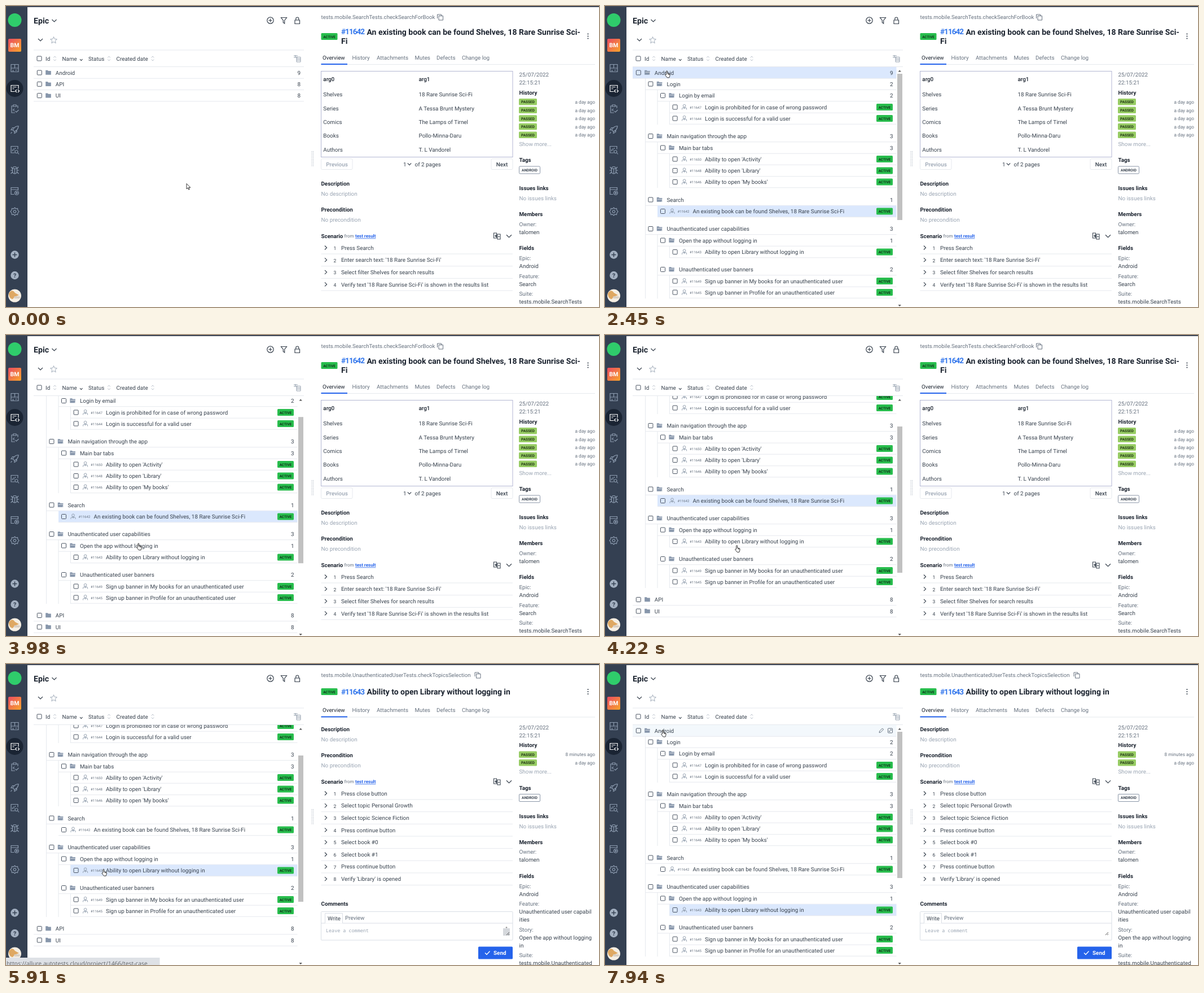
These frames come from a looping animation (1051 px wide and 533 px high, 8000 ms). An HTML page:

```html
<!DOCTYPE html>
<html lang="en">
<head>
<meta charset="utf-8">
<title>Test case tree</title>
<style>
html, body { margin: 0; width: 100%; height: 100%; overflow: hidden; background: #fff; }
svg { display: block; width: 100%; height: 100%; font-family: Roboto, "Open Sans", sans-serif; text-rendering: geometricPrecision; }
</style>
</head>
<body>
<svg id="stage" viewBox="0 0 1051 533" xmlns="http://www.w3.org/2000/svg"></svg>
<script>
const LOOP = 8000;
const INK = '#39434f', DARK = '#1c2430', GREY = '#66717f', MUTE = '#9aa5b3', LINE = '#e6e9ee', BLUE = '#2563eb';
const BOOKS = '18 Rare Sunrise Sci-Fi';

// drawing helpers
const T = (x, y, s, { size = 9.9, fill = INK, w = 400, a = 'start', more = '' } = {}) =>
  `<text x="${x}" y="${y + size * 0.36}" font-size="${size}" fill="${fill}" font-weight="${w}" text-anchor="${a}" ${more}>${s}</text>`;
const R = (x, y, w, h, fill, more = '') => `<rect x="${x}" y="${y}" width="${w}" height="${h}" fill="${fill}" ${more}/>`;
const box = (x, y, w, h, stroke, r = 0) => R(x, y, w, h, 'none', `stroke="${stroke}" rx="${r}"`);
const P = (d, stroke = INK, w = 1, fill = 'none') => `<path d="${d}" fill="${fill}" stroke="${stroke}" stroke-width="${w}"/>`;
const C = (x, y, r, fill, more = '') => `<circle cx="${x}" cy="${y}" r="${r}" fill="${fill}" ${more}/>`;
const H = (x1, x2, y, color = LINE) => R(x1, y, x2 - x1, 1, color);
const at = (x, y, s) => `<g transform="translate(${x} ${y})">${s}</g>`;
const head = (x, y, s) => T(x, y, s, { fill: DARK, w: 600, size: 9.8 });
const down = (x, y, k = 4, c = INK) => P(`M${x - k} ${y - k / 2}l${k} ${k} ${k} ${-k}`, c, 1.2);
const right = (x, y) => P(`M${x - 2} ${y - 3.5}l3.5 3.5 -3.5 3.5`, INK, 1.2);
const check = (x, y) => box(x - 4, y - 4, 8, 8, '#4a5462', 1);
const copy = (x, y) => P(`M${x - 5} ${y + 2}v-7h7v2M${x - 2.5} ${y - 2.5}h7.5v7.5h-7.5z`, GREY, 1);
const active = (x, y, w = 29) => R(x, y - 6, w, 12, '#28bd4d', 'rx="1.5"') +
  T(x + w / 2, y + 0.3, 'ACTIVE', { size: 6.3, w: 700, a: 'middle', fill: '#10331b' });
const sorter = x => P(`M${x - 2.2} 91.5l2.2-2.5 2.2 2.5M${x - 2.2} 94.5l2.2 2.5 2.2-2.5`, '#b4bcc7', 0.9);

function sidebar() {
  const c = '#8d9cb0', ic = (y, d, col = c) => at(15.5, y, P(d, col, 1.2));
  return R(0, 0, 38, 533, '#344052') +
    C(15.5, 25, 12, '#2fcc6b') +
    R(4, 58, 23, 23, 'url(#tile)', 'rx="2"') + T(15.5, 69.7, 'BM', { size: 10.5, w: 700, a: 'middle', fill: '#fff' }) +
    C(15.5, 146, 15, '#1a2433') +
    ic(110, 'M-6.5-6.5h13v13h-13zM-6.5 0h13M0-6.5v6.5M-3 3v3.5M1 3.5h3') +
    ic(146, 'M0 5.5h-6.5v-11h13v6M-4-2.5h7M-4 .5h3M3.5 2l-2.5 2.5 2.5 2.5M5.5 2l2.5 2.5-2.5 2.5', '#fff') +
    ic(182, 'M-2.5-5h-3v12h6M2.5-5h3v4M-2.5-7h5v3h-5zM-.5 0l-2.5 2 2.5 2M1 4l2 2 4-4') +
    ic(219, 'M6.5-6.5c-5 0-8 3-10 7l3 3c4-2 7-5 7-10zM-3.5.5h-3l2.5-4h3M-.5 3.5v3l4-2.5v-3M-5 4l-2 3') +
    ic(255, 'M0 5h-6.5v-11.5h12v5M-4 2v-3M-1.5 1v-4M1-2v-2M3 .5a2.5 2.5 0 1 1-.1 0M5.5 5l2 2.5') +
    ic(291, 'M-3.5-3a3.5 3.5 0 0 1 7 0zM-4-3h8v5a4 4 0 0 1-8 0zM0-3v9M-4 0h-3.5M4 0h3.5M-4 3l-3 3M4 3l3 3M-4-3l-2.5-3M4-3l2.5-3') +
    ic(328, 'M-1 5.5h-5.5v-12h12.5v5M-6.5-3h12.5M3.5-.5a3.5 3.5 0 1 1-.1 0M2.7 1.5l2.3 1.5-2.3 1.5z') +
    ic(364, 'M0-7l2 2 3-.5 .5 3 2 2.5-2 2.5-.5 3-3-.5-2 2-2-2-3 .5-.5-3-2-2.5 2-2.5 .5-3 3 .5zM0-2.3a2.3 2.3 0 1 1-.1 0') +
    C(15.5, 440.5, 7.2, '#a3b0c1') + at(15.5, 440.5, P('M-4 0h8M0-4v8', '#344052', 1.5)) +
    C(15.5, 477, 7.2, '#a3b0c1') + T(15.5, 477, '?', { size: 10.5, w: 700, a: 'middle', fill: '#344052' }) +
    C(15.5, 513, 11.5, '#f5eee3') + P('M5 509c5-8 9-4 11-1l7 4c-6 2-8 3-11 7-4 0-7-4-7-10z', 'none', 0, '#dfa862') +
    R(14, 514, 11, 4, '#d8cfc4', 'rx="2"');
}

function listHeader() {
  return T(49, 25.5, 'Epic', { size: 14.2, w: 600, fill: DARK }) + down(85.5, 26) +
    C(468.5, 25.5, 5.7, 'none', `stroke="${INK}" stroke-width="1.2"`) + P('M465.5 25.5h6M468.5 22.5v6', INK, 1.2) +
    P('M487.5 20.5h10l-3.8 5v5.5l-2.4-1.8v-3.7z', INK, 1.2) +
    P('M512 25h8.5v6.5h-8.5zM513.8 25v-2.5a2.5 2.5 0 0 1 5 0v2.5', INK, 1.2) +
    down(61, 60, 4) +
    P('M84.5 54.5l1.7 3.9 4.2.4-3.2 2.8 1 4.2-3.7-2.2-3.7 2.2 1-4.2-3.2-2.8 4.2-.4z', '#a1acba', 1) +
    H(49, 528, 77.5) + check(59, 93) + T(70, 93, 'Id') + sorter(86.5) +
    T(99.5, 93, 'Name') + P('M131 94l2.3 2.7 2.3-2.7', INK, 1.1) +
    T(146, 93, 'Status') + sorter(182.5) + T(195.5, 93, 'Created date') + sorter(260) +
    P('M510 88h7M510 91h7M513 87v4M515 90.5h7v8.5h-7zM515 93.5h7M515 96h7', '#8c98a8', 0.9) + H(49, 528, 107);
}

// tree rows: name, centre y, level, child count or case id
const rows = [
  ['Android', 118, 0, 9], ['Login', 138, 1, 2], ['Login by email', 158.5, 2, 2],
  ['Login is prohibited for in case of wrong password', 179, 3, '#11647'],
  ['Login is successful for a valid user', 199, 3, '#11644'],
  ['Main navigation through the app', 230.5, 1, 3], ['Main bar tabs', 251, 2, 3],
  ["Ability to open 'Activity'", 271, 3, '#11650'], ["Ability to open 'Library'", 291.5, 3, '#11648'],
  ["Ability to open 'My books'", 311.5, 3, '#11646'],
  ['Search', 343, 1, 1], ['An existing book can be found Shelves, ' + BOOKS, 363.5, 2, '#11642'],
  ['Unauthenticated user capabilities', 394.5, 1, 3], ['Open the app without logging in', 415, 2, 1],
  ['Ability to open Library without logging in', 435.5, 3, '#11643'],
  ['Unauthenticated user banners', 466.5, 2, 2],
  ['Sign up banner in My books for an unauthenticated user', 487, 3, '#11649'],
  ['Sign up banner in Profile for an unauthenticated user', 507, 3, '#11645'],
  ['API', 538.5, 0, 8], ['UI', 559, 0, 8]
].map(([name, y, level, tag]) => ({ name, y, level, tag, leaf: typeof tag === 'string' }));
const shut = rows.filter(r => r.level === 0).map((r, i) => ({ ...r, y: 118 + i * 20.3 }));

const folder = (x, y, open) => P(`M${x - 4.8} ${y + 3.8}v-8h3.6l1.2 1.3h4.8v6.7z`, 'none', 0, '#8796ab') +
  (open ? P(`M${x - 3.6} ${y - 0.8}h9l-1.5 4.6`, '#fff', 0.7) : '');
const person = (x, y) => C(x, y - 2.3, 2.3, 'none', 'stroke="#8a97a8" stroke-width=".9"') +
  P(`M${x - 4} ${y + 4.5}v-1.5q0-2 2-2h4q2 0 2 2v1.5M${x - 1.5} ${y + 1}l1.5 2 1.5-2`, '#8a97a8', 0.9);
const grip = (x, y) => [0, 1, 2, 3].map(i => R(x, y - 4 + i * 2.4, 1, 1, '#98a3b2') + R(x + 2.5, y - 4 + i * 2.4, 1, 1, '#98a3b2')).join('');
const tools = (x, y) => P(`M${x - 19.5} ${y + 3.5}l.6-2.6 5-5 2 2-5 5z`, GREY, 1) + box(x - 4, y - 4, 8, 8, GREY, 1) +
  P(`M${x - 2} ${y + 2}l4-4M${x} ${y - 2}h2v2M${x - 2} ${y}v2h2`, GREY, 0.8);

function row(r, edge, open, bg, hovered) {
  const { name, y, level, tag, leaf } = r, x = 59.3 + level * 21.6, left = level ? x - 9.5 : 49;
  const s = (bg ? R(left, y - 10, edge - left, 20, bg) : '') + H(left, edge, y + 9.7) + check(x, y);
  if (leaf) {
    return s + person(x + 16.5, y) + T(x + 26, y + 0.7, tag, { size: 6.1, fill: GREY }) + T(x + 53, y, name) +
      (hovered ? grip(x - 9, y) : active(481, y));
  }
  return s + folder(x + 15.7, y, open && name !== 'API' && name !== 'UI') + T(x + 28.5, y, name) +
    (hovered ? tools(edge - 11, y) : T(edge - 8.7, y, tag, { a: 'middle' }));
}

// right pane
const TABS = [[561, 'Overview'], [613.5, 'History'], [657, 'Attachments'], [724.5, 'Mutes'], [763, 'Defects'], [808, 'Change log']];
const tabs = y => TABS.map(([x, s], i) => T(x, y, s, { size: 9.8, fill: i ? GREY : DARK })).join('') +
  H(558, 1044, y + 12) + R(558.5, y + 11, 46.5, 2, BLUE);
const path = (s, end) => T(558.5, 20, s, { fill: GREY, size: 9.65 }) + copy(end, 20);
const number = (y, s) => T(594, y, s, { size: 13.6, w: 600, fill: '#3276ec', more: 'letter-spacing="-1"' });
const title = (x, y, s) => T(x, y, s, { size: 14, w: 600, fill: DARK });
const kebab = y => [-4, 0, 4].map(d => C(1031.5, y + d, 1.1, INK)).join('');
const pair = (y, name) => head(558.5, y, name) + T(558.5, y + 17.5, 'No ' + name.toLowerCase(), { fill: MUTE });
const scenario = (y, steps) => head(558.5, y, 'Scenario') + T(599.5, y + 0.5, 'from', { size: 8, fill: GREY }) +
  T(619, y + 0.5, 'test result', { size: 8, w: 600, fill: BLUE, more: 'text-decoration="underline"' }) +
  P(`M864.5 ${y - 5}h5v9h-5zM871 ${y - 3}h5v9h-5zM866 ${y}h3.5M872 ${y + 1.5}h3M867.5 ${y - 1.5}l2 1.5-2 1.5`, INK, 1.1) +
  down(891.5, y + 0.5, 4.5) +
  steps.map((s, i) => {
    const v = y + 21 + i * 21.65;
    return right(567, v) + T(583, v + 0.8, i + 1, { size: 8.6, a: 'middle' }) + T(594, v, s) + H(558.5, 898, v + 10.5);
  }).join('');
const passed = (y, when) => R(909, y - 6, 32, 11.5, '#97cc64', 'rx="1.5"') +
  T(925, y, 'PASSED', { size: 6.5, w: 700, a: 'middle', fill: '#1e3312' }) + T(1044, y, when, { size: 8.3, a: 'end', fill: GREY });

function side(y, runs, fields) {
  const x = 909.5, grey = (v, s, fill = MUTE) => T(x, v, s, { fill });
  let v = y + 48.4, s = T(x, y, '25/07/2022', { fill: GREY }) + T(x, y + 14, '22:15:21', { fill: GREY }) + head(x, y + 31.5, 'History');
  runs.forEach((when, i) => { s += passed(v + i * 14.65, when); });
  v += runs.length * 14.65 + 0.8;
  s += grey(v, 'Show more...') + head(x, v + 28.5, 'Tags') + box(909.5, v + 40, 37, 13, '#8b97a8', 1.5) +
    T(928, v + 46.6, 'ANDROID', { size: 6.5, w: 600, a: 'middle' }) +
    head(x, v + 79, 'Issues links') + grey(v + 96.5, 'No issues links') +
    head(x, v + 125, 'Members') + grey(v + 142.3, 'Owner:', GREY) + T(x, v + 156.3, 'talomen') + head(x, v + 185, 'Fields');
  v += 202.8;
  for (const [label, ...lines] of fields) {
    s += grey(v, label + ':', GREY);
    lines.forEach((l, i) => { s += T(x, v + 14 * (i + 1), l); });
    v += 17.4 + 14 * lines.length;
  }
  return s;
}

function searchPane() {
  const table = [['arg0', 'arg1'], ['Shelves', BOOKS], ['Series', 'A Tessa Brunt Mystery'], ['Comics', 'The Lamps of Tirnel'],
    ['Books', 'Pollo-Minna-Daru'], ['Authors', 'T. L Vandorel']];
  return path('tests.mobile.SearchTests.checkSearchForBook', 769.5) +
    active(558.5, 54) + number(45.5, '#11642') + title(639.5, 45.5, `An existing book can be found Shelves, ${BOOKS.slice(0, -2)}`) +
    title(594, 62, 'Fi') + kebab(53.5) + tabs(91) + box(558.5, 115.5, 339.5, 152, '#b3b7d3') +
    table.map(([a, b], i) => {
      const y = i ? 132.2 + i * 24.4 : 129.8, o = i ? {} : { w: 500, fill: DARK };
      return T(562.3, y, a, o) + T(731.5, y, b, o);
    }).join('') +
    box(558.5, 270.5, 55.5, 19, LINE, 2) + T(586.5, 280, 'Previous', { a: 'middle', w: 500, fill: MUTE }) +
    T(704, 280, '1') + down(715, 280, 3.2) + T(724.5, 280, 'of 2 pages') +
    box(860, 270.5, 38, 19, LINE, 2) + T(879, 280, 'Next', { a: 'middle', w: 500 }) +
    pair(314.5, 'Description') + pair(360.5, 'Precondition') +
    scenario(407, ['Press Search', `Enter search text: '${BOOKS}'`, 'Select filter Shelves for search results',
      `Verify text '${BOOKS}' is shown in the results list`]) +
    head(558.5, 536.5, 'Comments') +
    side(121.5, Array(5).fill('a day ago'), [['Epic', 'Android'], ['Feature', 'Search'], ['Suite', 'tests.mobile.SearchTests']]);
}

function libraryPane() {
  return path('tests.mobile.UnauthenticatedUserTests.checkTopicsSelection', 836) +
    active(558.5, 49) + number(49, '#11643') + title(639.5, 49, 'Ability to open Library without logging in') + kebab(49) + tabs(81.5) +
    pair(115.5, 'Description') + pair(161.5, 'Precondition') +
    scenario(208, ['Press close button', 'Select topic Personal Growth', 'Select topic Science Fiction', 'Press continue button',
      'Select book #0', 'Select book #1', 'Press continue button', "Verify 'Library' is opened"]) +
    head(558.5, 424, 'Comments') + box(558.5, 438.5, 339.5, 50.5, '#d9dee5', 1) + H(559, 898, 458.5, '#d9dee5') +
    R(565.5, 441.5, 31, 18, '#fff') + P('M565.5 459v-17.5h31v17.5', '#d9dee5') +
    T(570, 450.7, 'Write') + T(601, 449, 'Preview', { fill: GREY }) +
    T(567, 472, 'Leave a comment', { size: 8.45, fill: MUTE, more: 'font-family="Noto Sans Mono, monospace"' }) +
    R(837, 500.5, 61, 22, BLUE, 'rx="1.5"') + P('M849 511.5l3 3 5.5-6', '#fff', 1.3) + T(864, 511.5, 'Send', { w: 600, fill: '#fff' }) +
    side(112, ['8 minutes ago', 'a day ago'], [['Epic', 'Android'], ['Feature', 'Unauthenticated user capabil', 'ities'],
      ['Story', 'Open the app without logging', 'in'], ['Suite', 'tests.mobile.Unauthenticated']]);
}

// timeline: bursts of [start, count], 120 ms apart inside a burst
const BURSTS = [[0, 1], [150, 2], [420, 4], [930, 2], [1200, 1], [1350, 1], [1500, 1], [2180, 2], [2450, 5], [3080, 4], [3590, 1],
  [3740, 5], [4370, 4], [4880, 4], [5390, 2], [5910, 2], [6180, 2], [6440, 4], [6950, 2], [7220, 2], [7490, 1], [7640, 1], [7790, 1], [7940, 1]];
const POINTER = [[0, 319.5, 314], [270, 319.5, 312.5], [780, 249.5, 167], [930, 92.5, 155], [1050, 103, 139], [1200, 151, 122],
  [1350, 119, 115.5], [1500, 106, 114.3], [2450, 106, 114.3], [2930, 170, 142], [3440, 237, 338], [3590, 233, 362.5], [4220, 230, 372],
  [4730, 233.5, 366], [5240, 233.5, 365], [5510, 233.5, 365], [6030, 150, 362], [6300, 120, 264], [6800, 275, 222], [7070, 141.5, 246],
  [7340, 141.5, 246], [7490, 100, 166], [7640, 80, 120], [7790, 85, 115], [7940, 99, 116.5]];
const SCROLL = [[3620, 0], [4220, 70], [7070, 70], [7340, 0]];

function snap(t) {
  const [start, n] = BURSTS.findLast(b => b[0] <= t);
  return start + Math.min(n - 1, Math.floor((t - start) / 120)) * 120;
}
function track(keys, t) {
  const i = keys.findIndex(k => k[0] > t);
  if (i < 1) return (i ? keys[keys.length - 1] : keys[0]).slice(1);
  const a = keys[i - 1], b = keys[i], f = (t - a[0]) / (b[0] - a[0]);
  return a.slice(1).map((v, j) => v + (b[j + 1] - v) * f);
}

// vertical tree guides: x, top, bottom
const GUIDES = [[71, 128, 518], [92.5, 148, 210], [92.5, 241, 322], [92.5, 404, 518],
  [114, 169, 210], [114, 261, 322], [114, 425, 446], [114, 477, 518]];

function tree(t, x, y) {
  const open = t >= 2180, full = t >= 2450, edge = full ? 516.5 : 528, [scroll] = track(SCROLL, t);
  const list = !open ? shut : full ? rows : rows.filter(r => r.y < 320);
  // hover stays off while the page settles around scrolling
  const still = t < 780 || (t >= 3440 && t < 3590) || (t >= 3740 && t < 4370);
  const picked = t < 5390 ? '#11642' : '#11643';
  let s = full ? GUIDES.map(([gx, a, b]) => R(gx, a, 1, b - a, LINE)).join('') : '';
  for (const r of list) {
    const over = !still && x < edge && Math.abs(y + scroll - r.y) < 10;
    const chosen = r.tag === picked || (r.name === 'Android' && open && t < 5390);
    const pressed = r.tag === '#11643' && t >= 5000;
    const bg = chosen ? '#dbe8fd' : pressed ? '#e2eefc' : over ? '#f3f8fc' : '';
    s += row(r, edge, open, bg, over && !chosen);
  }
  s = `<g clip-path="url(#list)">${at(0, -scroll, s)}</g>`;
  if (full) s += P('M519.5 116.5l2.7-3 2.7 3z', 'none', 0, '#555') + P('M519.5 529l2.7 3 2.7-3z', 'none', 0, '#555') +
    R(518, 120 + scroll * 0.6, 9, 259, '#c1c1c1');
  return s;
}

function status(t) {
  if (t < 5000 || t >= 7940) return '';
  const wide = t >= 5910;
  return R(0, 520, wide ? 272.5 : 249.5, 13, '#dee1e6') + T(1, 530.5, 'https://allure.autotests.cloud/project/1466/test-' + (wide ? 'case' : ''),
    { size: 10.3, fill: '#5f6368', more: 'font-family="Open Sans, sans-serif"' });
}

const resizer = t => (t < 7220 ? R(881, 468, 12, 13, '#d5d8dc') + P('M885.5 466.5h3M887 465v3', '#777', 0.8) : '') +
  P('M887 480l5-5M890 480l2-2', '#555', 1);

const ARROW = 'M.5 .5v9.5l2.3-2.1 1.5 3.4 1.5-.7-1.5-3.2h3z';
const HAND = 'M2.7 7.3V1.5a.9.9 0 0 1 1.9 0V5l3.5.8c.8.2 1.2.7 1.1 1.5L8.7 10l-.8 2.5H4.2L.8 8.2c-.5-.8.7-1.5 1.3-.9zM6 5.5v2M7.6 6v1.7';

function frame(t) {
  const [x, y] = track(POINTER, t), later = t >= 5510;
  panes[0].setAttribute('display', later ? 'none' : 'inline');
  panes[1].setAttribute('display', later ? 'inline' : 'none');
  live.innerHTML = tree(t, x, y) + (later ? resizer(t) : '') + status(t) + at(x, y, P(t < 780 ? ARROW : HAND, '#222', 0.9, '#fff'));
}

const stage = document.getElementById('stage');
const splitter = Array.from({ length: 10 }, (_, i) => [541.5, 544].map(x => R(x, 257 + i * 2.8, 1.2, 1.2, '#b3bbc6')).join('')).join('');
stage.innerHTML = `<defs><linearGradient id="tile" x2="1" y2="1"><stop stop-color="#ec4b62"/><stop offset="1" stop-color="#f8a52b"/></linearGradient>
  <clipPath id="list"><rect x="38" y="108" width="492" height="425"/></clipPath></defs>` +
  R(0, 0, 1051, 533, '#fff') + sidebar() + R(0, 0, 1051, 2, '#3d4655') + listHeader() + splitter +
  `<g class="pane">${searchPane()}</g><g class="pane">${libraryPane()}</g><g id="live"></g>`;
const panes = stage.querySelectorAll('.pane'), live = document.getElementById('live');

let shown = -1;
function loop(now) {
  const t = snap(now % LOOP);
  if (t !== shown) frame(shown = t);
  requestAnimationFrame(loop);
}
loop(0);
</script>
</body>
</html>
```
